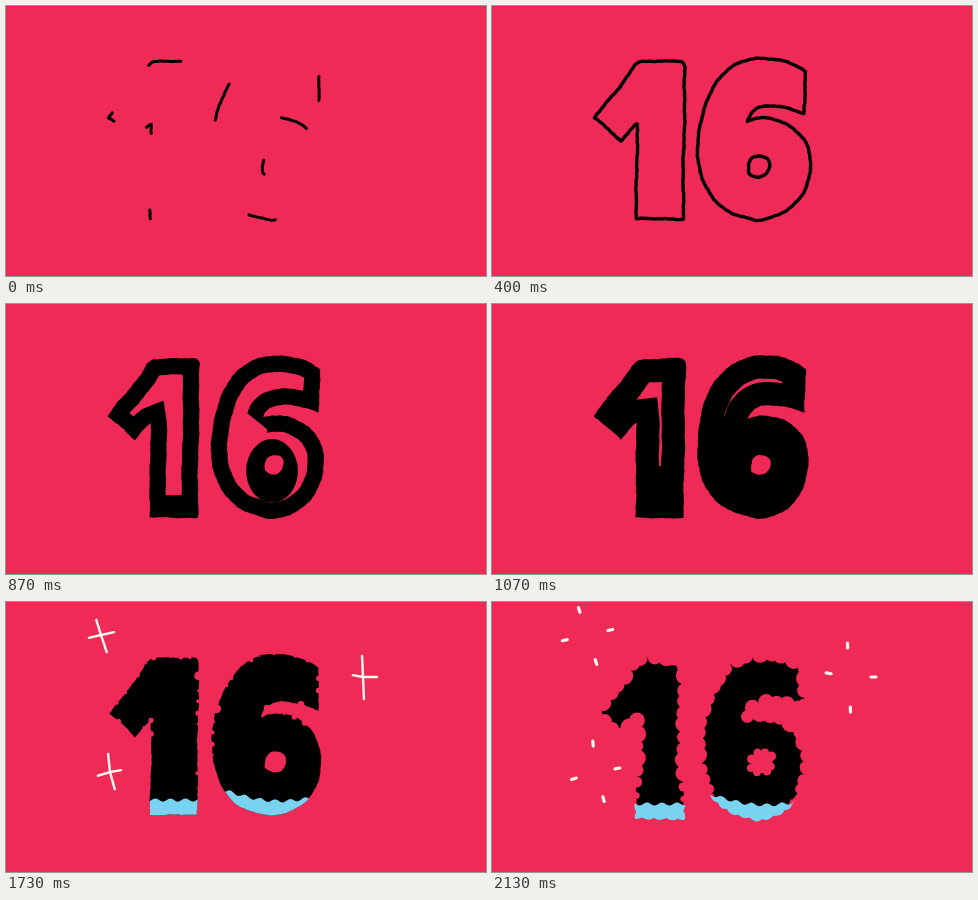
An HTML page with a canvas that plays this animation: 480x270 px, repeating every 2190 ms.

```html
<!DOCTYPE html>
<html lang="en">
<head>
<meta charset="utf-8">
<title>16</title>
<style>
  html, body { margin: 0; width: 100%; height: 100%; overflow: hidden; background: #ef2a56; }
  canvas { display: block; width: 100vw; height: 100vh; }
</style>
</head>
<body>
<canvas id="stage" width="480" height="270"></canvas>
<script>
const RED = '#ef2a56', BLACK = '#000', BLUE = '#78d3f1', WHITE = '#fff6f0';
const LOOP = 2190, STEP = 1000 / 15;
const ctx = document.getElementById('stage').getContext('2d');
ctx.lineJoin = ctx.lineCap = 'round';

const clamp = v => Math.max(0, Math.min(1, v));
const lerp = (a, b, k) => a + (b - a) * k;
const rnd = n => { const v = Math.sin(n * 12.9898 + 4.1) * 43758.5453; return v - Math.floor(v); };

// Piecewise linear value over time: key(t, [time, value], ...)
function key(t, ...keys) {
  if (t <= keys[0][0]) return keys[0][1];
  for (let i = 1; i < keys.length; i++) {
    const [t0, a] = keys[i - 1], [t1, b] = keys[i];
    if (t <= t1) return lerp(a, b, (t - t0) / (t1 - t0));
  }
  return keys[keys.length - 1][1];
}

// Samples a path; side = direction in which the ink lies. Seeds are [x, y, half length].
function makeShape(d, side, seeds) {
  const path = document.createElementNS('http://www.w3.org/2000/svg', 'path');
  path.setAttribute('d', d);
  const len = path.getTotalLength(), n = Math.round(len / 1.5), pts = [];
  for (let i = 0; i < n; i++) {
    const p = path.getPointAtLength(len * i / n);
    pts.push({ x: p.x, y: p.y, s: len * i / n });
  }
  pts.forEach((p, i) => {
    const a = pts[(i + n - 4) % n], b = pts[(i + 4) % n];
    const dx = b.x - a.x, dy = b.y - a.y, m = Math.hypot(dx, dy) || 1;
    p.nx = -dy / m * side;
    p.ny = dx / m * side;
  });
  const starts = seeds.map(([x, y, h]) => {
    let best = 0, min = 1e9;
    pts.forEach((p, i) => {
      const q = Math.hypot(p.x - x, p.y - y);
      if (q < min) { min = q; best = i; }
    });
    return { i: best, h: h / 1.5 };
  }).sort((a, b) => a.i - b.i);
  return { pts, starts };
}

const one = makeShape(
  'M103 112 L113 98 Q128 81 138 66 Q143 56 150 56 L188 55 Q194 56 193 64 L192 120 L191 213 L144 213 L145 160 L145 118 Q139 122 129 135 L118 124 Z',
  1, [[158, 55, 16], [103, 112, 6], [144, 120, 8], [144, 209, 5]]);
const six = makeShape(
  'M313 66 Q296 52 270 52 C236 51 206 86 206 143 C206 182 225 204 246 209 L264 214 C297 212 315 190 315 157 C315 130 296 112 272 112 Q262 112 255 116 Q258 101 275 100 Q292 100 312 108 Z',
  -1, [[213, 95, 20], [313, 82, 12], [288, 116, 14], [256, 212, 13]]);
const hole = makeShape(
  'M259 166 Q258 150 270 150 Q281 151 280 160 Q278 171 268 171 Q262 170 259 166 Z',
  -1, [[259, 162, 8]]);

// Shaky outline, redrawn on every step; bump puffs it out in small waves.
function outline(shape, t, bump = 0) {
  const b = key(t, [600, 1], [1200, 0]);
  const seed = Math.round(t / STEP) * 3 + 1;
  const ph = [1, 2, 3].map(j => rnd(seed + j * 50) * 6.28);
  const inner = shape === hole;
  return shape.pts.map(({ x, y, s, nx, ny }) => {
    const d = .5 * (Math.sin(s * .07 + ph[0]) + .5 * Math.sin(s * .25 + ph[1]) + .3 * Math.sin(s * .8 + ph[2]))
      - bump * Math.abs(Math.sin(s * .26));
    const wide = 3 * b * clamp((x - 280) / 30) * clamp((y - 112) / 20);
    return [x + nx * d + (inner ? -3 * b : wide), y + ny * d];
  });
}

function trace(pts, close = true) {
  ctx.beginPath();
  pts.forEach(p => ctx.lineTo(...p));
  if (close) ctx.closePath();
}

function fill(pts, color) {
  trace(pts);
  ctx.fillStyle = color;
  ctx.fill();
}

function stroke(width, color = BLACK) {
  ctx.lineWidth = width;
  ctx.strokeStyle = color;
  ctx.stroke();
}

// Strokes spread from each seed until they meet.
function sketch(shape, t) {
  const pts = outline(shape, t), n = pts.length, k = clamp(t / 400);
  const { starts } = shape;
  starts.forEach(({ i, h }, j) => {
    const m = starts.length;
    const next = (starts[(j + 1) % m].i - i + n) % n || n;
    const prev = (i - starts[(j + m - 1) % m].i + n) % n || n;
    const from = i - Math.round(lerp(h, prev / 2, k)), to = i + Math.round(lerp(h, next / 2, k));
    const part = [];
    for (let q = from; q <= to; q++) part.push(pts[(q + 2 * n) % n]);
    trace(part, false);
    stroke(lerp(3, 3.4, k));
  });
}

// Ink grows inwards from the edge.
function thicken(t) {
  const w = key(t, [400, 1.5], [470, 3], [600, 8], [870, 15.5], [1200, 27]);
  for (const shape of [one, six]) {
    const pts = outline(shape, t);
    ctx.save();
    trace(pts);
    ctx.clip();
    ctx.lineJoin = 'miter';
    ctx.miterLimit = 3;
    stroke(2 * w);
    ctx.fillStyle = BLACK;
    if (shape === one) {
      const h = key(t, [600, 8], [870, 22], [1130, 60]);
      ctx.fillRect(140, 213 - h, 56, h);
    } else {
      const at = (...v) => key(t, ...[400, 600, 870, 1130].map((q, i) => [q, v[i]]));
      ctx.beginPath();
      ctx.ellipse(at(266, 268, 266, 262), at(160, 160, 167, 167), at(11, 15.5, 26, 52), at(11, 15.5, 32, 55), 0, 0, 7);
      ctx.fill();
    }
    ctx.restore();
    trace(pts);
    stroke(key(t, [470, 3.4], [870, 1.5]));
  }
  fill(outline(hole, t), RED);
  stroke(key(t, [470, 3.4], [870, 2], [1200, .5]));
}

const surface = new Map([
  [one, () => 198],
  [six, x => { const u = clamp((x - 221) / 84); return 189 + 7 * u + 6 * Math.sin(Math.PI * u); }],
]);

function water(shape, t, melt) {
  const off = key(t, [1600, 18], [1730, 0], [2130, 4]);
  const edge = [];
  for (let x = 120; x <= 340; x += 2) edge.push([x, surface.get(shape)(x) + off + 1.6 * Math.sin(x * .42 + t * .01)]);
  ctx.save();
  trace([...edge, [340, 240], [120, 240]]);
  ctx.clip();
  ctx.translate(0, 3 * melt);
  fill(outline(shape, t, 2 * melt), BLUE);
  ctx.restore();
}

// Round bites along the edge, fewer and smaller near the bottom.
function nibble(shape, amount, gap, size) {
  const { pts } = shape, count = Math.round(pts.length * 1.5 / gap);
  ctx.fillStyle = RED;
  for (let i = 0; i < count; i++) {
    const { x, y } = pts[Math.floor((i + .3 * rnd(i + 70)) * pts.length / count)];
    const r = size * (.85 + .3 * rnd(i + 30)) * clamp(amount * 1.7 - rnd(i + 9)) * clamp((208 - y) / 35);
    ctx.beginPath();
    ctx.arc(x, y, r, 0, 7);
    ctx.fill();
  }
}

function solid(t) {
  const bite = key(t, [1600, 0], [1730, .3], [2130, 1]);
  const melt = key(t, [1730, 0], [2130, 1]);
  for (const shape of [one, six]) {
    fill(outline(shape, t), BLACK);
    nibble(shape, bite, 12, 8);
    if (t > 1600) water(shape, t, melt);
  }
  fill(outline(hole, t), RED);
  nibble(hole, melt, 9, 4.5);
}

// Centre, then the tips of the four arms.
const sparks = [
  [[95, 33], [90, 17], [101, 51], [82, 36], [109, 30]],
  [[357, 75], [356, 53], [358, 98], [346, 73], [372, 75]],
  [[104, 170], [102, 151], [109, 188], [91, 174], [116, 168]],
];

function sparkle(t) {
  const grow = key(t, [1470, 0], [1530, .15], [1600, .55], [1670, .88], [1730, 1]);
  const fly = key(t, [1730, 0], [2130, 1]);
  if (!grow) return;
  for (const [[cx, cy], ...tips] of sparks) {
    for (const [x, y] of tips) {
      const len = Math.hypot(x - cx, y - cy), ux = (x - cx) / len, uy = (y - cy) / len;
      const a = fly * (len + 7), b = (len - 1) * grow + 13 * fly;
      ctx.beginPath();
      ctx.moveTo(cx + ux * a, cy + uy * a);
      ctx.lineTo(cx + ux * b, cy + uy * b);
      stroke(lerp(2.4, 3.2, fly), WHITE);
    }
  }
}

// Holds each drawing for its time.
function snap(t) {
  if (t >= 1866) return 1870 + 260 / 3 * Math.min(3, Math.floor((t - 1866) / 87));
  return Math.min(26, Math.floor((t + 4) / STEP)) * STEP;
}

function draw(now) {
  const t = snap(now % LOOP);
  ctx.fillStyle = RED;
  ctx.fillRect(0, 0, 480, 270);
  if (t < 410) [one, six, hole].forEach(s => sketch(s, t));
  else if (t < 1190) thicken(t);
  else solid(t);
  sparkle(t);
}

let start;
function tick(now) {
  start ??= now;
  draw(now - start);
  requestAnimationFrame(tick);
}
draw(0);
requestAnimationFrame(tick);
</script>
</body>
</html>
```
